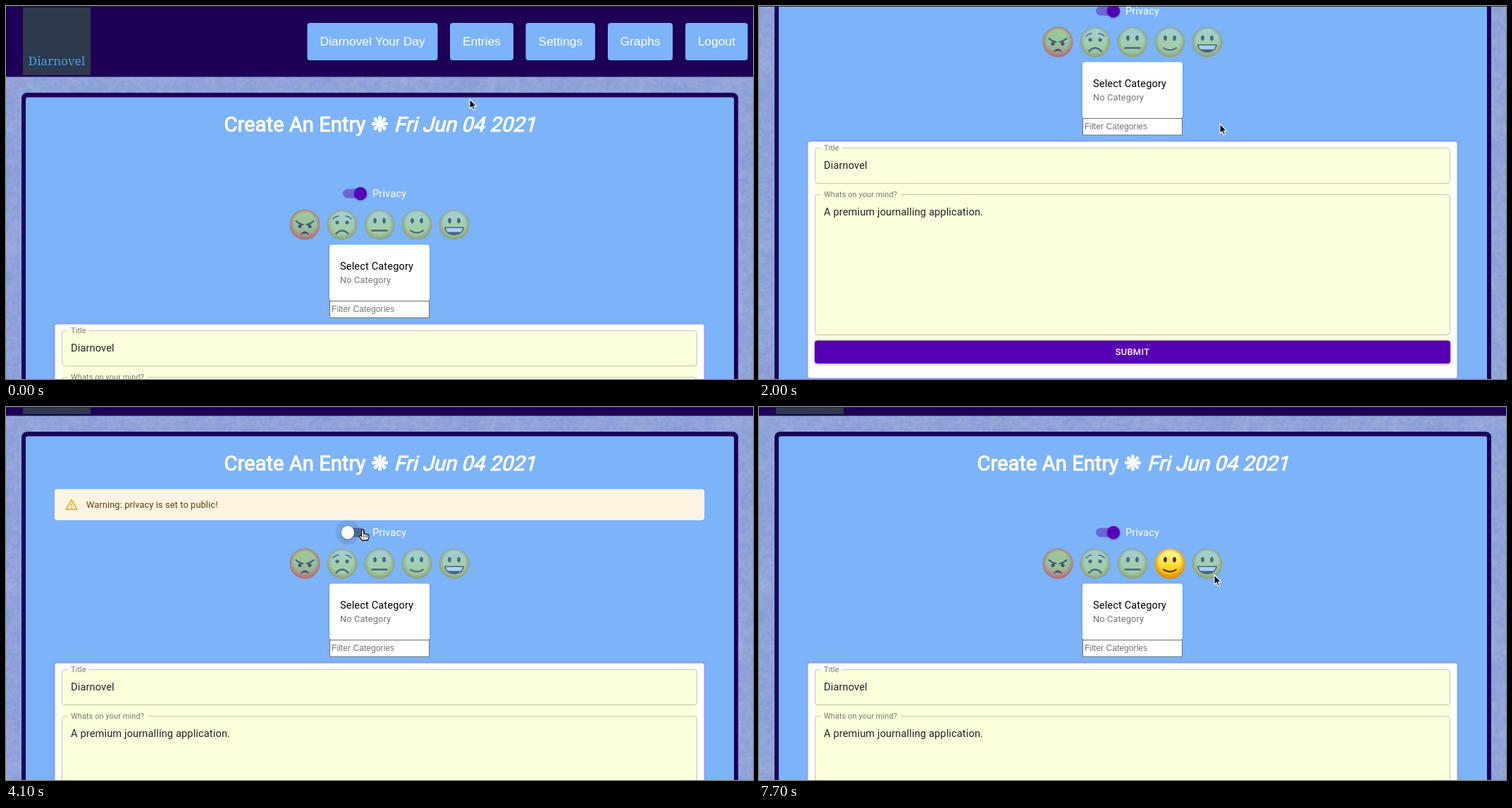
Animation of 1060x529 px, one loop 8 s. Source, as an HTML page with a canvas:

```html
<!DOCTYPE html>
<html lang="en">
<head>
<meta charset="utf-8">
<title>Diarnovel</title>
<style>
  html, body { margin: 0; width: 100%; height: 100%; overflow: hidden; }
  canvas { display: block; }
</style>
</head>
<body>
<canvas id="stage" width="1060" height="529"></canvas>
<script>
const W = 1060, H = 529, LOOP = 8000;
const NAVY = '#1d0055', SKY = '#7cb3f9', PURPLE = '#5600b5', CREAM = '#fbffdc';
const ctx = document.getElementById('stage').getContext('2d');

// Motion: [time, value...]
const SCROLL = [[200, 0], [500, 13], [800, 51], [1500, 182], [1800, 239], [2000, 259],
  [2100, 235], [2200, 160], [2300, 97], [2400, 97], [2500, 94], [3200, 94], [3300, 88]];
const POINTER_DRIFT = [[200, 658, 132], [800, 654, 153], [1500, 653, 165], [2000, 654, 167]];
const POINTER_STEPS = [[3300, 506, 174], [4300, 311, 142], [4500, 375, 143], [4600, 439, 143],
  [4800, 490, 146], [4900, 538, 148], [5100, 530, 154], [5200, 505, 168], [5300, 487, 177],
  [6200, 620, 165], [6300, 748, 190], [6400, 655, 238], [6600, 612, 230], [6800, 600, 228],
  [6900, 588, 226], [7000, 583, 225], [7400, 600, 245], [7500, 640, 277], [7600, 652, 262],
  [7700, 646, 238]];

function glide(keys, t) {
  const i = keys.findIndex(k => k[0] > t);
  if (i === 0) return keys[0].slice(1);
  if (i < 0) return keys[keys.length - 1].slice(1);
  const a = keys[i - 1], b = keys[i], f = (t - a[0]) / (b[0] - a[0]);
  return a.slice(1).map((v, n) => v + (b[n + 1] - v) * f);
}
const hold = (keys, t) => keys.filter(k => k[0] <= t).pop().slice(1);

function layer(w, h, draw) {
  const c = document.createElement('canvas');
  c.width = w; c.height = h;
  draw(c.getContext('2d'));
  return c;
}

let seed = 7;
const random = () => (seed = (seed * 16807) % 2147483647) / 2147483647;

// Mottled paper: several sizes of smoothed noise
const paper = layer(W, 820, g => {
  g.fillStyle = '#92a6da';
  g.fillRect(0, 0, W, 820);
  for (const [cell, strength] of [[2, 24], [4, 24], [9, 16], [30, 12]]) {
    const w = Math.ceil(W / cell), h = Math.ceil(820 / cell);
    const noise = layer(w, h, n => {
      const img = n.createImageData(w, h);
      for (let i = 0; i < img.data.length; i += 4) {
        const light = random() < 0.5;
        img.data.set(light ? [184, 196, 234] : [112, 137, 203], i);
        img.data[i + 3] = random() * strength * 2;
      }
      n.putImageData(img, 0, 0);
    });
    g.drawImage(noise, 0, 0, w * cell, h * cell);
  }
});

function box(x, y, w, h, r, fill, stroke) {
  ctx.beginPath();
  ctx.roundRect(x, y, w, h, r);
  if (fill) { ctx.fillStyle = fill; ctx.fill(); }
  if (stroke) { ctx.strokeStyle = stroke; ctx.lineWidth = 1; ctx.stroke(); }
}
function shadowBox(color, blur, dy, ...args) {
  ctx.save();
  Object.assign(ctx, { shadowColor: color, shadowBlur: blur, shadowOffsetY: dy });
  box(...args);
  ctx.restore();
}
function disc(x, y, r, fill) {
  ctx.beginPath();
  ctx.arc(x, y, r, 0, 7);
  ctx.fillStyle = fill;
  ctx.fill();
}
function text(str, x, y, font, color, spacing = 0, align = 'left') {
  ctx.font = font;
  ctx.fillStyle = color;
  ctx.letterSpacing = spacing + 'px';
  ctx.textAlign = align;
  ctx.fillText(str, x, y);
}
const roboto = (size, weight = 400) => `${weight} ${size}px Roboto, sans-serif`;
const arial = size => `${size}px "Liberation Sans", Arial, sans-serif`;
const BODY = roboto(14.59), SMALL = roboto(12.77), LABEL = roboto(10.94);

// Mood faces, drawn around their centre with radius 22
const ovalEyes = g => {
  g.beginPath();
  for (const s of [-1, 1]) g.ellipse(s * 6.5, -5.5, 2.4, 3.9, 0, 0, 7);
  g.fill();
};
const roundEyes = (g, y) => {
  for (const s of [-1, 1]) { g.beginPath(); g.arc(s * 7, y, 2.6, 0, 7); g.fill(); }
};
const line = (g, x1, y1, cx, cy, x2, y2) => {
  g.beginPath(); g.moveTo(x1, y1); g.quadraticCurveTo(cx, cy, x2, y2); g.stroke();
};
const angry = g => {
  for (const s of [-1, 1]) line(g, s * 12.5, -5, s * 8, -1, s * 2.5, 0);
  roundEyes(g, 2.5);
  g.beginPath(); g.moveTo(-7, 15); g.quadraticCurveTo(0, 4, 7, 15);
  g.quadraticCurveTo(0, 10.5, -7, 15); g.fill();
};
const worried = g => {
  g.lineWidth = 1.5;
  for (const s of [-1, 1]) line(g, s * 13, -8, s * 9, -12, s * 5, -12);
  roundEyes(g, -3);
  g.lineWidth = 2.4;
  line(g, -8.5, 13, 0, 4, 8.5, 13);
};
const neutral = g => { ovalEyes(g); g.lineWidth = 2.6; line(g, -10.5, 8.5, 0, 8.5, 10.5, 8.5); };
const smiling = g => { ovalEyes(g); line(g, -9, 8.5, 0, 14.5, 9, 8.5); };
const grinning = g => {
  ovalEyes(g);
  g.beginPath(); g.moveTo(-14, 3.5); g.lineTo(14, 3.5);
  g.bezierCurveTo(13, 19, -13, 19, -14, 3.5); g.fill();
  g.fillStyle = '#a9d2f8';
  g.beginPath(); g.moveTo(-12, 5); g.lineTo(12, 5);
  g.quadraticCurveTo(11, 9.5, 9, 10.5); g.lineTo(-9, 10.5);
  g.quadraticCurveTo(-11, 9.5, -12, 5); g.fill();
};

const DIM = { tones: ['#a3d0e0', '#a1cfb0', '#a2c898'], rim: '130,145,120', ink: '#4b6580' };
const DIM_RED = { tones: ['#a8c596', '#92c7a0', '#b0908a'], rim: '180,95,105', ink: '#4b4f6e' };
const BRIGHT = { tones: ['#fff9b0', '#ffe63c', '#f6a800'], rim: '215,115,0', ink: '#4a2c12' };
const makeFace = (draw, { tones, rim, ink }) => layer(92, 92, g => {
  g.scale(2, 2);
  g.translate(23, 23);
  const skin = g.createLinearGradient(0, -22, 0, 22);
  tones.forEach((c, n) => skin.addColorStop(n / 2, c));
  g.fillStyle = skin;
  g.beginPath(); g.arc(0, 0, 21.7, 0, 7); g.fill();
  const edge = g.createRadialGradient(0, -2, 15, 0, 0, 22);
  edge.addColorStop(0, `rgba(${rim},0)`);
  edge.addColorStop(1, `rgba(${rim},.75)`);
  g.fillStyle = edge;
  g.fill();
  g.fillStyle = g.strokeStyle = ink;
  g.lineWidth = 2;
  g.lineCap = 'round';
  draw(g);
});
const faces = [angry, worried, neutral, smiling, grinning]
  .map((draw, i) => makeFace(draw, i ? DIM : DIM_RED));
const chosenFace = makeFace(smiling, BRIGHT);

function drawHeader() {
  ctx.fillStyle = NAVY;
  ctx.fillRect(0, 0, W, 100.5);
  box(24, 2, 96, 96, 0, '#2d394c');
  text('Diarnovel', 72, 84, '17px "Noto Serif", serif', '#4d9fe2', 0, 'center');
  const buttons = [['Diarnovel Your Day', 427.5, 612.5], ['Entries', 630, 720],
    ['Settings', 737.5, 836], ['Graphs', 854, 946], ['Logout', 964, 1052.5]];
  for (const [label, left, right] of buttons) {
    box(left, 24, right - left, 53, 4, SKY);
    text(label, (left + right) / 2, 56, arial(17.4), '#fff', 0, 'center');
  }
}

function drawHeading() {
  const boldText = (str, x, slant) => {
    ctx.save();
    ctx.transform(1, 0, -slant, 1, x, 177.5);
    text(str, 0, 0, roboto(29.2), '#fff');
    ctx.strokeStyle = '#fff';
    ctx.lineWidth = 1;
    ctx.lineJoin = 'round';
    ctx.strokeText(str, 0, 0);
    ctx.restore();
  };
  boldText('Create An Entry', 309.5, 0);
  boldText('Fri Jun 04 2021', 550.5, 0.25);
  ctx.fillStyle = '#fff';
  for (let i = 0; i < 8; i++) {
    ctx.save();
    ctx.translate(530.5, 167);
    ctx.rotate(i * Math.PI / 4);
    ctx.beginPath();
    ctx.moveTo(-0.9, 0);
    ctx.lineTo(-2.5, -8.6);
    ctx.arc(0, -9, 2.6, Math.PI, 0);
    ctx.lineTo(0.9, 0);
    ctx.fill();
    ctx.restore();
  }
}

function drawWarning() {
  box(69, 204.5, 922, 44, 4, '#fff4e2');
  ctx.save();
  ctx.translate(83, 216.5);
  ctx.scale(0.833, 0.833);
  ctx.fillStyle = '#e9ab05';
  ctx.fill(new Path2D('M12 5.99L19.53 19H4.47L12 5.99M12 2L1 21h22L12 2zm1 14h-2v2h2v-2zm0-6h-2v4h2v-4z'));
  ctx.restore();
  text('Warning: privacy is set to public!', 114, 231, SMALL, '#663c00', 0.13);
}

function drawToggle(isPrivate, thumbX, hovered) {
  box(478, 259.5, 31.5, 13, 6.5, isPrivate ? '#6b66d6' : '#4d6f9b');
  if (hovered) disc(thumbX, 266, 17.5, isPrivate ? 'rgba(86,0,181,.05)' : 'rgba(0,0,0,.07)');
  ctx.save();
  Object.assign(ctx, { shadowColor: 'rgba(0,0,0,.35)', shadowBlur: 3, shadowOffsetY: 1 });
  disc(thumbX, 266, 9.2, isPrivate ? PURPLE : '#fafafa');
  ctx.restore();
  text('Privacy', 520, 271, BODY, '#fff', 0.14);
}

function drawField(label, value, top, bottom, notchEnd) {
  box(79.5, top, 901, bottom - top, 4, CREAM, '#c3c7aa');
  ctx.fillStyle = CREAM;
  ctx.fillRect(87, top - 1, notchEnd - 87, 2);
  text(label, 92, top + 3.5, LABEL, '#77796a', 0.1);
  text(value, 92, top + 29.5, BODY, '#22231e', 0.14);
}

function drawForm() {
  shadowBox('rgba(0,0,0,.25)', 3, 1, 459, 338.5, 142, 79.5, 3.5, '#fff');
  text('Select Category', 474, 374, BODY, '#000', 0.14);
  text('No Category', 474, 393, SMALL, '#757575', 0.14);
  box(459.5, 418.5, 141, 23.5, 0, '#fff', '#6e6e6e');
  text('Filter Categories', 462, 434, arial(12.16), '#757575');

  shadowBox('rgba(170,110,225,.7)', 4, 0, 69.5, 451.5, 921, 335, 3, '#fff');
  ctx.fillStyle = CREAM;
  ctx.fillRect(79, 505, 902, 235);
  drawField('Title', 'Diarnovel', 460.5, 510.5, 118);
  drawField('Whats on your mind?', 'A premium journalling application.', 526.5, 725.5, 201);
  shadowBox('rgba(0,0,0,.4)', 4, 1, 79, 733.5, 902, 32.5, 4, PURPLE);
  text('SUBMIT', 530, 754, roboto(12.77, 500), '#fff', 0.36, 'center');
}

const ARROW = new Path2D('M0 0V16.2L3.8 12.8L6.4 18.6L9 17.5L6.5 11.8H11.6Z');
const HAND = new Path2D('M-1.5 1Q0-.8 1.5 1V6Q3 5 4.3 6.4Q5.8 5.6 6.8 7Q8.8 6.4 8.8 8.5V11Q8.6 13 7.4 15H-1Q-3 12-4.8 9.6Q-4.4 7.2-1.5 9.5Z');
function drawPointer(x, y, hand) {
  ctx.save();
  ctx.translate(x, y);
  if (!hand) ctx.scale(0.85, 0.85);
  ctx.lineJoin = 'round';
  const shape = hand ? HAND : ARROW;
  ctx.fillStyle = hand ? '#fff' : '#111';
  ctx.strokeStyle = hand ? '#111' : '#fff';
  ctx.lineWidth = 1.3;
  ctx.fill(shape);
  ctx.stroke(shape);
  if (hand) {
    ctx.lineWidth = 0.9;
    for (const fx of [1.8, 4.2, 6.5]) {
      ctx.beginPath(); ctx.moveTo(fx, 7.5); ctx.lineTo(fx, 11); ctx.stroke();
    }
  }
  ctx.restore();
}

function render(time) {
  const t = Math.floor(time / 100) * 100;
  const isPrivate = t < 3800 || t >= 5900;
  const hovering = (t >= 3300 && t < 4300) || (t >= 5300 && t < 6200);
  const thumbX = t === 3800 ? 494 : isPrivate ? 503 : 485;

  ctx.save();
  ctx.translate(0, -Math.round(glide(SCROLL, t)[0]));
  ctx.drawImage(paper, 0, 0);
  drawHeader();
  box(22, 123, 1017, 780, 8, NAVY);
  box(28, 129.5, 1005, 760, 3, SKY);
  drawHeading();
  if (!isPrivate) drawWarning();
  drawToggle(isPrivate, thumbX, hovering);
  faces.forEach((face, i) => {
    const chosen = i === 3 && t >= 7400;
    ctx.drawImage(chosen ? chosenFace : face, 401 + i * 53, 287, 46, 46);
  });
  drawForm();
  ctx.restore();

  ctx.fillStyle = '#25252b';
  ctx.fillRect(0, 0, W, 1);
  const [x, y] = t < 3300 ? glide(POINTER_DRIFT, t) : hold(POINTER_STEPS, t);
  drawPointer(x, y, hovering);
}

const start = performance.now();
function tick() {
  render((performance.now() - start) % LOOP);
  requestAnimationFrame(tick);
}
tick();
</script>
</body>
</html>
```
